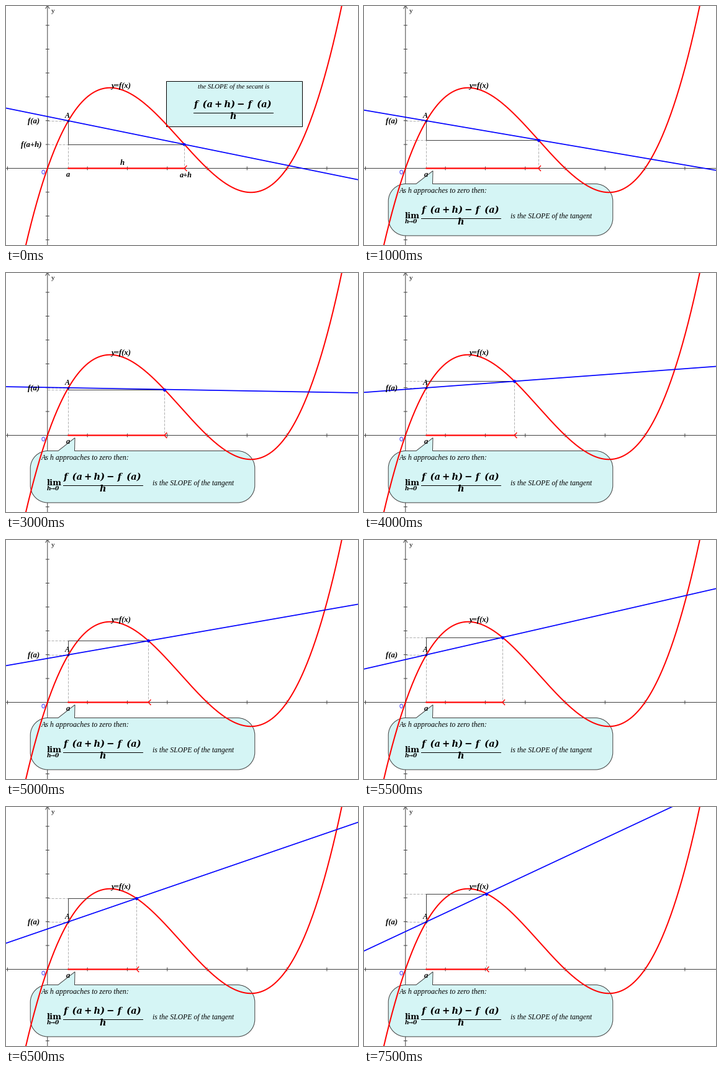
Write a matplotlib script that moves like this. It is 567 by 385 pixels and loops after 8 s.

```python
import numpy as np
import matplotlib.pyplot as plt
from matplotlib.animation import FuncAnimation
from matplotlib.patches import PathPatch, Rectangle
from matplotlib.path import Path

W, H = 567, 385
OX, OY = 66.8, 261.5          # origin in pixels
UX, UY = 64.3, 38.4           # pixels per unit
A, B_START, B_STEP = 0.524, 3.43, 0.1
FRAMES, INTERVAL = 16, 500
RED, BLUE, INK, GRAY, PALE = "#ff0000", "#0000ff", "#404040", "#b0b0b0", "#d5f5f5"
THIN = "\u2009"               # thin space

# At 72 dpi one point is one pixel.
fig = plt.figure(figsize=(W / 72, H / 72), dpi=72, facecolor="white")
ax = fig.add_axes([0, 0, 1, 1])
ax.set_xlim(0, W)
ax.set_ylim(H, 0)
ax.axis("off")


def f(u):
    return 0.2 * u * (u - 4) * (u - 6)


def px(u):
    return OX + UX * u


def py(v):
    return OY - UY * v


def line(xs, ys, color, width, z, **kw):
    return ax.plot(xs, ys, color=color, lw=width, zorder=z, **kw)[0]


def axis_line(xs, ys):
    return line(xs, ys, INK, 1, 2, snap=False)


def label(x, y, s, size, weight="normal", style="italic",
          family="Liberation Serif", ha="left", color="black"):
    return ax.text(x, y, s, fontsize=size, fontweight=weight, fontstyle=style,
                   fontfamily=family, ha=ha, va="baseline", color=color, zorder=8)


def bold(x, y, s, size=12.8, **kw):
    return label(x, y, s, size, weight="bold", **kw)


def quotient(x, y):
    """Difference quotient centred on a fraction bar at (x, y)."""
    style = dict(family="DejaVu Serif", ha="center")
    top = "f_ (a_+_h)_− f_ (a)".replace("_", THIN)
    return [bold(x, y - 8, top, 14.8, **style),
            line([x - 64, x + 64], [y, y], "black", 1, 8),
            bold(x, y + 11, "h", 14.5, **style)]


def callout_path(left, top, right, bottom, r):
    M, L, Q = Path.MOVETO, Path.LINETO, Path.CURVE4
    k = 0.45 * r
    steps = [
        (M, left + r, top), (L, 84, top), (L, 111, 265.5), (L, 110.5, top),
        (L, right - r, top),
        (Q, right - k, top), (Q, right, top + k), (Q, right, top + r),
        (L, right, bottom - r),
        (Q, right, bottom - k), (Q, right - k, bottom), (Q, right - r, bottom),
        (L, left + r, bottom),
        (Q, left + k, bottom), (Q, left, bottom - k), (Q, left, bottom - r),
        (L, left, top + r),
        (Q, left, top + k), (Q, left + k, top), (Q, left + r, top),
        (Path.CLOSEPOLY, left + r, top),
    ]
    return Path([s[1:] for s in steps], [s[0] for s in steps])


# Axes, ticks and curve
axis_line([0, W], [OY, OY])
axis_line([OX, OX], [0, H])
axis_line([OX - 3, OX, OX + 3], [4, -1, 4])
for i in range(-1, 8):
    axis_line([px(i)] * 2, [OY - 2.5, OY + 2.5])
for j in range(-3, 7):
    axis_line([OX - 2.5, OX + 2.5], [py(j)] * 2)
u = np.linspace(-1, 8, 500)
line(px(u), py(f(u)), RED, 2, 4)

label(72.5, 11, "y", 11, style="normal")
label(56.5, 271, "O", 8, style="normal", family="DejaVu Sans", color=BLUE)
bold(95, 179.5, "A", 12)
bold(169, 132, "y=f(x)")
bold(35, 189.4, "f(a)")
bold(97, 274.8, "a", 12.2)

xa, ya = px(A), py(f(A))
dash = dict(dashes=(4, 2))
line([OX, xa], [ya, ya], GRAY, 1, 3, **dash)
line([xa, xa], [ya, OY], GRAY, 1, 3, **dash)
line([xa], [ya], "#000090", 0, 7, marker="o", ms=3.4, mew=0)

# Parts that follow the moving point
level = line([], [], GRAY, 1, 3, **dash)
drop = line([], [], GRAY, 1, 3, **dash)
step = line([], [], INK, 1, 5)
secant = line([], [], BLUE, 1.7, 6)
span = line([], [], RED, 2.2, 5, snap=False)
arrow = line([], [], RED, 1.4, 5)
point = line([], [], BLUE, 0, 7, ms=5, mew=0)

# Opening note on the secant
opening = [
    ax.add_patch(Rectangle((257.5, 120.5), 219, 73.5, fc=PALE, ec="black", lw=1, zorder=2.5)),
    label(309, 133, "the SLOPE of the secant is", 10.75),
    *quotient(366, 171.5),
    bold(24, 227, "f(a+h)"),
    bold(184, 255.5, "h"),
    bold(279.5, 275.5, "a+h", 12.2),
]

# Note on the limit covers the axes but not the curve
limit = [
    ax.add_patch(PathPatch(callout_path(39.2, 286.5, 400.8, 370, 28),
                           fc=PALE, ec=INK, lw=1, zorder=2.5, snap=False)),
    label(57, 301, "As h approaches to zero then:", 11.9),
    bold(65.5, 342.3, "lim", 13.3, style="normal", family="DejaVu Serif"),
    bold(66, 350.3, "h→0", 9, family="DejaVu Serif"),
    *quotient(155.5, 341.5),
    label(236, 342, "is the SLOPE of the tangent", 11.8),
]


def update(i):
    b = B_START - B_STEP * max(i - 1, 0)
    x, y = px(b), py(f(b))
    slope = (y - ya) / (x - xa)
    level.set_data([OX, x], [y, y])
    drop.set_data([x, x], [y, OY])
    step.set_data([xa, xa, x], [ya, y, y])
    secant.set_data([0, W], [ya - slope * xa, ya + slope * (W - xa)])
    span.set_data([xa, x], [OY, OY])
    arrow.set_data([x + 3.5, x, x + 3.5], [OY - 4, OY, OY + 4])
    point.set_data([x], [y])
    at_start = i < 2
    point.set_marker("s" if at_start else "o")
    point.set_markersize(4 if at_start else 5)
    for artist in opening:
        artist.set_visible(at_start)
    for artist in limit:
        artist.set_visible(not at_start)
    return []


anim = FuncAnimation(fig, update, frames=FRAMES, interval=INTERVAL,
                     init_func=lambda: update(0), repeat=True, repeat_delay=0, blit=False)
plt.show()
```
